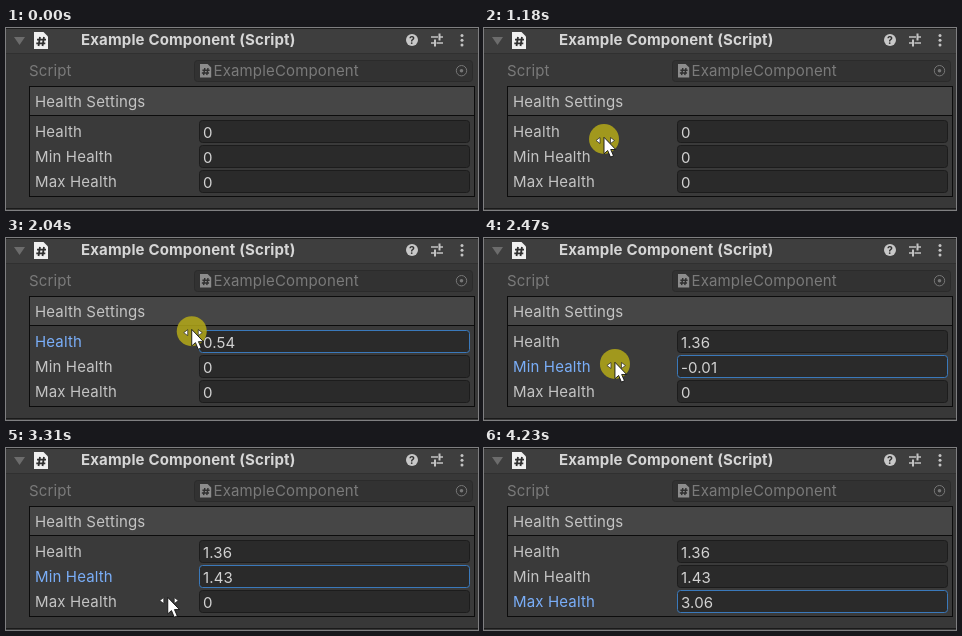
These frames come from a looping animation (472x182 px, 5130 ms). An HTML page:

```html
<!DOCTYPE html>
<html lang="en">
<head>
<meta charset="utf-8">
<title>Draggable number fields</title>
<style>
  html, body { margin: 0; width: 100%; height: 100%; overflow: hidden; background: #383838; }
  svg { display: block; width: 472px; height: 182px; }
  text { font: 15px Inter, "Liberation Sans", sans-serif; letter-spacing: .15px; fill: #c4c4c4; white-space: pre; }
  .title { font-weight: 700; fill: #d6d6d6; }
  .dim { fill: #7a7a7a; }
  .help { font-size: 10.5px; font-weight: 700; fill: #333; text-anchor: middle; }
  .box { fill: #2a2a2a; stroke: #1c1c1c; }
  .value { fill: #d2d2d2; }
  .focus .box { stroke: #3a79bb; }
  .focus .label { fill: #7aaef8; }
</style>
</head>
<body>
<svg viewBox="0 0 472 182">
  <defs>
    <g id="script">
      <path d="M0 0H9.5L14 4.5V17H0Z"/>
      <path d="M6 5L4.5 14M10 5L8.5 14M3 7.7H12M2.3 11.3H11.3" fill="none" stroke="#303030" stroke-width="1.8"/>
    </g>
  </defs>

  <rect width="472" height="182" fill="#383838"/>
  <rect width="472" height="25" fill="#3e3e3e"/>
  <path d="M0 .5H472" stroke="#1c1c1c"/>
  <path d="M0 25.5H472" stroke="#303030"/>
  <path d="M0 180.5H472" stroke="#1a1a1a"/>
  <path d="M8 9H19L13.5 17Z" fill="#6c6c6c"/>
  <use href="#script" x="28" y="4" fill="#f0f0f0"/>
  <text class="title" x="75" y="17.2">Example Component (Script)</text>

  <circle cx="406" cy="12" r="6" fill="#c8c8c8"/>
  <text class="help" x="406" y="16">?</text>
  <path d="M425 9H432M434 9H437M425 15H428M430.5 15H437" fill="none" stroke="#c4c4c4" stroke-width="1.5"/>
  <path d="M433.5 5.5V12.5M429 11.5V18.5" stroke="#c4c4c4" stroke-width="2"/>
  <g fill="#c4c4c4"><circle cx="456" cy="7.5" r="1.5"/><circle cx="456" cy="12.2" r="1.5"/><circle cx="456" cy="17" r="1.5"/></g>

  <text class="dim" x="23" y="48">Script</text>
  <rect x="188.5" y="32.5" width="278" height="21" rx="3" fill="#323232" stroke="#2b2b2b"/>
  <use href="#script" transform="translate(194 36) scale(.8)" fill="#8c8c8c"/>
  <text class="dim" x="207.5" y="48">ExampleComponent</text>
  <circle cx="455.5" cy="42.7" r="5.2" fill="none" stroke="#777"/>
  <circle cx="455.5" cy="42.7" r="1.8" fill="#777"/>

  <rect x="23.5" y="58.5" width="445" height="110" fill="#3a3a3a" stroke="#0c0c0c"/>
  <rect x="24" y="59" width="444" height="28" fill="#464646"/>
  <path d="M23 87.5H469" stroke="#0c0c0c"/>
  <text x="29" y="79">Health Settings</text>

  <g id="rows"></g>

  <g id="pointer">
    <circle id="halo" r="15" fill="#b2a818" fill-opacity=".86"/>
    <path id="resize" d="M-8 1.5L-4 -1.5V4.5ZM10.5 1.5L6.5 -1.5V4.5Z" fill="#fff" stroke="#222" stroke-width=".7"/>
    <path d="M0 -1.7V14.8L3.7 11.5L6.5 18.1L9.5 16.8L6.7 10.5H11.7Z" fill="#fff" stroke="#111" stroke-width=".9"/>
  </g>
</svg>
<script>
const LOOP = 5130, RUN = 530, STEP = 47, LAG = 33;

// Turning points of the pointer: time, x, y
const turns = [
  [400, 236, 172], [1040, 120, 111], [1180, 120, 111],
  [1424, 180, 98], [1862, 86, 101.5], [2134, 223, 90],
  [2380, 134.3, 125], [2710, 69, 144], [3185, 220, 135],
  [3400, 115, 164], [3600, 165, 164], [3810, 110, 164], [4090, 315, 165],
  [4200, 318, 186]
];
const enter = turns[0][0], leave = turns[turns.length - 1][0];

const fields = [
  { name: "Health", press: 1180, release: 2134, end: 1.36 },
  { name: "Min Health", press: 2380, release: 3185, end: 1.43 },
  { name: "Max Health", press: 3400, release: 4090, end: 3.06 }
];

const $ = id => document.getElementById(id);
const clamp = (v, lo, hi) => Math.min(hi, Math.max(lo, v));
const ease = u => (1 - Math.cos(Math.PI * u)) / 2;

function at(time) {
  const t = clamp(time, enter, leave);
  const i = turns.findIndex(k => k[0] >= t) || 1;
  const [t0, x0, y0] = turns[i - 1], [t1, x1, y1] = turns[i];
  const e = ease((t - t0) / (t1 - t0));
  return [x0 + (x1 - x0) * e, y0 + (y1 - y0) * e];
}

// The number follows the pointer's sideways travel, slightly late.
function valueOf(f, t) {
  const x = time => at(time)[0], start = x(f.press);
  const moved = x(clamp(t - LAG, f.press, f.release)) - start;
  return moved / (x(f.release) - start) * f.end;
}

$("rows").innerHTML = fields.map((f, i) => `
  <g transform="translate(0 ${i * 25})">
    <text class="label" x="29" y="109">${f.name}</text>
    <rect class="box" x="193.5" y="92.5" width="270" height="22" rx="3"/>
    <text class="value" x="197" y="109.8">0</text>
  </g>`).join("");
const rows = [...$("rows").children];

// Hold each pose for one step; steps restart with every run.
const snap = t => t - (t - fields[0].press + 3 * RUN) % RUN % STEP;

function draw(now) {
  const time = now % LOOP, t = snap(time);
  const [x, y] = at(t);
  const active = fields.filter(f => t > f.press + 20).pop();
  const held = fields.some(f => t >= f.press && t <= f.release);
  const overLabel = x > 24 && x < 190 && y > 92 && y < 167;

  fields.forEach((f, i) => {
    rows[i].setAttribute("class", f === active ? "focus" : "");
    rows[i].lastElementChild.textContent = String(+valueOf(f, t).toFixed(2));
  });
  $("pointer").style.display = time >= enter && t < leave ? "" : "none";
  $("pointer").setAttribute("transform", `translate(${x} ${y})`);
  $("halo").style.display = held ? "" : "none";
  $("resize").style.display = held || overLabel ? "" : "none";
}

function tick() {
  draw(performance.now());
  requestAnimationFrame(tick);
}
tick();
</script>
</body>
</html>
```
